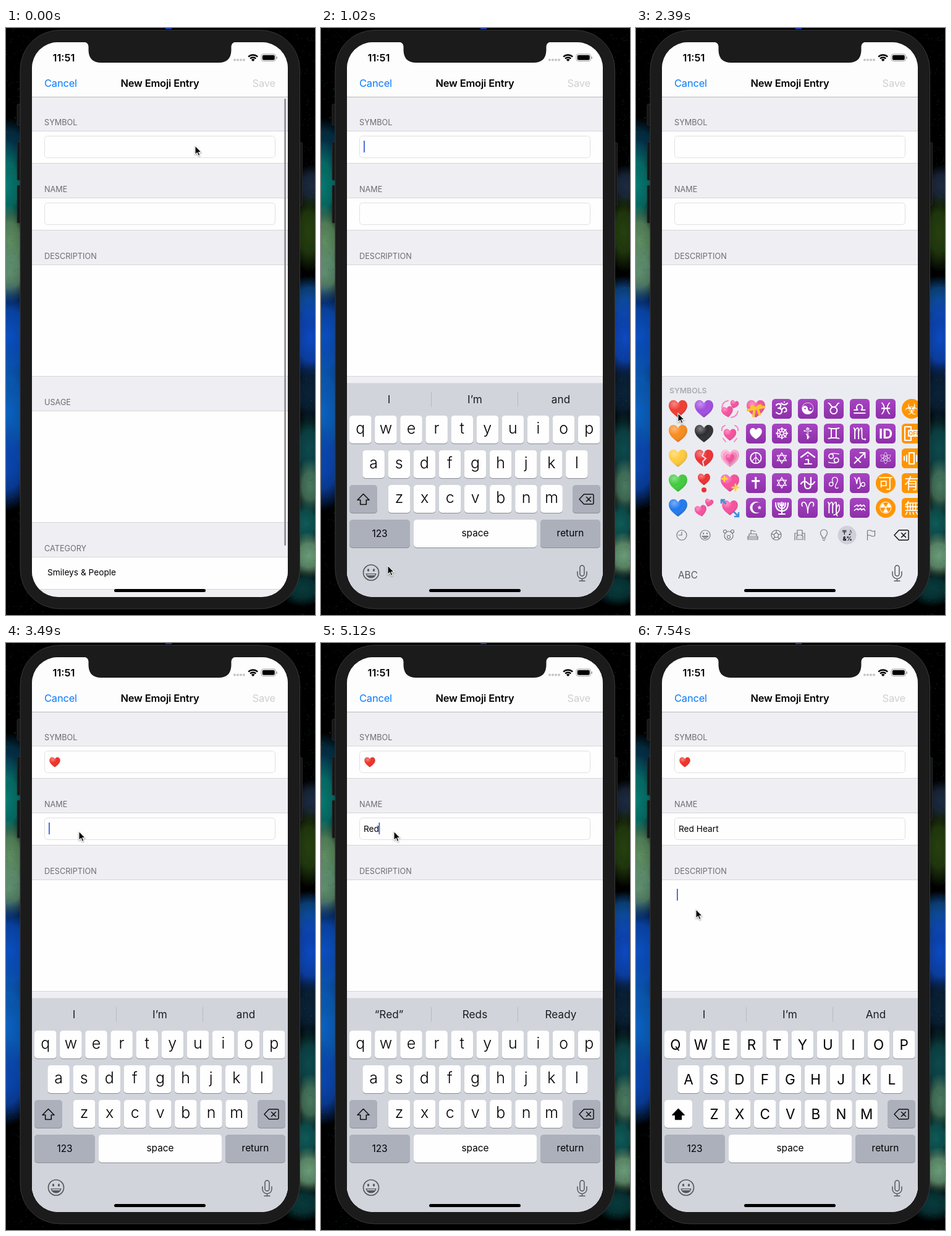
Animation of 500 by 948 pixels, one loop 7990 ms. Source, as an HTML page with a canvas:

```html
<!DOCTYPE html>
<html lang="en">
<head>
<meta charset="utf-8">
<title>New Emoji Entry</title>
<style>
html, body { margin: 0; width: 100%; height: 100%; overflow: hidden; background: #000; }
canvas, svg { position: absolute; left: 0; top: 0; width: 500px; height: 948px; }
text { font-family: Inter, Roboto, sans-serif; white-space: pre; }
.mid { text-anchor: middle; }
.nav { font-size: 16.5px; letter-spacing: -.2px; }
.head { font-size: 12.7px; fill: #6d6d72; }
.body { font-size: 13.7px; }
.hint { font-size: 17.2px; fill: #1c1c1e; }
.fn { font-size: 15.4px; }
.low { font-size: 25px; font-weight: 300; }
.cap { font-size: 22.5px; }
.sym { font: 26px "DejaVu Sans", sans-serif; }
.cjk { font: 500 24px "Noto Sans CJK JP", "Noto Sans CJK SC", sans-serif; }
.line { fill: none; stroke-linecap: round; stroke-linejoin: round; }
</style>
</head>
<body>
<canvas id="sky" width="500" height="948"></canvas>
<svg id="stage" viewBox="0 0 500 948"></svg>
<script>
const LOOP = 7990;

// ---------- backdrop ----------
function paintSky() {
  const g = document.getElementById('sky').getContext('2d');
  let seed = 7;
  const rnd = () => (seed = seed * 16807 % 2147483647) / 2147483647;
  g.fillStyle = '#000';
  g.fillRect(0, 0, 500, 948);
  const clouds = [
    [5, 190, 40, 45, '#04324a'], [0, 255, 40, 75, '#067a72'], [6, 345, 34, 60, '#5f8f62'],
    [4, 395, 40, 50, '#5f8f70'], [4, 500, 60, 90, '#0a4fc0'], [0, 620, 60, 110, '#0b62c4'],
    [0, 710, 50, 70, '#0a46b0'], [494, 255, 30, 35, '#1c2a40'], [490, 330, 30, 65, '#26400f'],
    [490, 440, 40, 40, '#0c4a8e'], [492, 500, 40, 75, '#0d49c0'], [490, 590, 30, 50, '#0a2238'],
    [490, 680, 30, 60, '#0d4a4e'], [492, 740, 25, 45, '#4a7a60'], [485, 800, 30, 40, '#0e5a58'],
    [490, 852, 35, 38, '#6a9c78'], [480, 905, 40, 30, '#083a3c']
  ];
  for (const [x, y, rx, ry, color] of clouds) {
    g.save();
    g.translate(x, y);
    g.scale(rx, ry);
    const fade = g.createRadialGradient(0, 0, 0, 0, 0, 1);
    fade.addColorStop(0, color);
    fade.addColorStop(.5, color + 'd0');
    fade.addColorStop(1, color + '00');
    g.fillStyle = fade;
    g.fillRect(-1, -1, 2, 2);
    g.restore();
  }
  const dust = ['#0d5a55', '#2f4a16', '#0b3d70', '#3a6a50'];
  for (let i = 0; i < 1500; i++) {
    const x = rnd() < .5 ? rnd() * 60 : 500 - rnd() * 60;
    g.globalAlpha = .2 + rnd() * .5;
    g.fillStyle = dust[rnd() * 4 | 0];
    g.fillRect(x | 0, rnd() * 948 | 0, 1, 1);
  }
  g.globalAlpha = 1;
  g.fillStyle = '#1838b0';
  g.fillRect(258, 0, 10, 2);
}

// ---------- drawing helpers ----------
const rect = (x, y, w, h, fill, r = 0, more = '') =>
  `<rect x="${x}" y="${y}" width="${w}" height="${h}" rx="${r}" fill="${fill}" ${more}/>`;
const text = (x, y, s, cls, more = '') => `<text x="${x}" y="${y}" class="${cls}" ${more}>${s}</text>`;
const line = (d, color, w = 1.5, x = 0, y = 0, fill = 'none') =>
  `<path class="line" d="${d}" transform="translate(${x} ${y})" stroke="${color}" stroke-width="${w}" style="fill:${fill}"/>`;
const ring = (r, x = 0, y = 0) => `M${x - r} ${y}a${r} ${r} 0 1 0 ${2 * r} 0a${r} ${r} 0 1 0 ${-2 * r} 0`;
const group = (id, s) => `<g id="${id}">${s}</g>`;

const HEART = 'M0 14C-4 11-15 4-15-5C-15-11-11-14-7.5-14C-4-14-1.5-12 0-9C1.5-12 4-14 7.5-14C11-14 15-11 15-5C15 4 4 11 0 14Z';
const heart = (x, y, fill, k = 1, turn = 0) =>
  `<g transform="translate(${x} ${y}) rotate(${turn}) scale(${k})"><path d="${HEART}" fill="${fill}"/><path d="${HEART}" fill="url(#shine)"/></g>`;
const erase = (x, y) =>
  line('M-4-8H9.5a2 2 0 0 1 2 2V6a2 2 0 0 1-2 2H-4L-11.5 0ZM0-3.5L7 3.5M7-3.5L0 3.5', '#111', 1.5, x, y);
const mic = y => rect(419, y - 13, 7, 17, 'none', 3.5, 'stroke="#55585c" stroke-width="1.5"') +
  line('M-7.5-3V1a7.5 7.5 0 0 0 15 0V-3M0 8.5V12M-4.5 12H4.5', '#55585c', 1.5, 422.5, y);
const grin = (x, y, r, color, w) => line(ring(r), color, w, x, y) +
  `<g transform="translate(${x} ${y}) scale(${r / 12.5})" fill="${color}"><ellipse cx="-4.5" cy="-4" rx="1.6" ry="2.2"/>
  <ellipse cx="4.5" cy="-4" rx="1.6" ry="2.2"/><path d="M-8.5 1.5H8.5C8 6 4.500 9 0 9S-8 6-8.500 1.500Z"/></g>` +
  line('M-6 3.500H6', '#e4e6ea', 1.3 * r / 12.5, x, y);

// ---------- phone and form ----------
function phone() {
  const side = (x, y, h) => rect(x, y, 6, h, '#161616', 1.5, 'stroke="#303030" stroke-width=".8"');
  return side(18, 123, 34) + side(18, 184, 62) + side(18, 254, 61) + side(473.5, 185, 101) +
    rect(23, 3.5, 452.5, 934.5, '#1b1b1b', 64, 'stroke="#383838"');
}

function form() {
  let s = rect(42, 23, 414, 896, '#efeef3') + rect(42, 23, 414, 88, '#fdfdfd') + rect(42, 111, 414, 1, '#b9b9bc');
  const rows = [['SYMBOL', 166, 52], ['NAME', 274, 52], ['DESCRIPTION', 382, 180], ['USAGE', 618, 180], ['CATEGORY', 854, 52]];
  for (const [title, y, h] of rows) {
    s += text(62, y - 9, title, 'head') + rect(42, y, 414, h + 1, '#d6d6da') + rect(42, y + 1, 414, h - 1, '#fefefe');
  }
  for (const y of [174.5, 282.5]) s += rect(62.5, y, 373, 35, '#fefefe', 5, 'stroke="#e0e0e2"');
  return s + text(62, 95, 'Cancel', 'nav', 'fill="#0a7aff"') +
    text(249, 95, 'New Emoji Entry', 'nav mid', 'font-weight="600"') +
    text(436, 95, 'Save', 'nav', 'text-anchor="end" fill="#d0d0d2"') +
    text(67, 884, 'Smileys &amp; People', 'body') +
    group('entry', heart(79, 192.500, '#ee3026', .58)) +
    `<text id="name" class="body" x="69" y="305"></text>` +
    `<rect id="caret" width="1.8" height="19" fill="#3b62d6"/>` +
    `<rect id="thumb" x="450.300" y="114" width="2.700" rx="1.300" fill="#8f8f92"/>`;
}

function status() {
  let s = text(93.5, 53.500, '11:51', 'mid', 'font-size="16.300" font-weight="600"');
  for (let i = 0; i < 4; i++) s += `<circle cx="${370 + i * 5}" cy="51.500" r="2" fill="#c6c6c9"/>`;
  const arc = r => `M${-.7 * r} ${-.7 * r}A${r} ${r} 0 0 1 ${.7 * r} ${-.7 * r}`;
  s += `<path d="${arc(10.7)}${arc(6.6)}" transform="translate(399.700 54)" fill="none" stroke="#000" stroke-width="2.400"/>`;
  s += `<path d="M0 0L-2.800-2.800A4 4 0 0 1 2.800-2.800Z" transform="translate(399.700 54)"/>`;
  return s + rect(413, 42, 23.500, 11.500, 'none', 3.500, 'stroke="#a0a0a2"') + rect(414.800, 43.800, 20, 8, '#000', 2) +
    rect(437.500, 46, 1.500, 4, '#a0a0a2', .7);
}

// ---------- letter keyboard ----------
function letters() {
  const key = (x, y, w, fill = '#fefefe', more = '') =>
    rect(x, y + 1, w, 45, '#8a8d94', 5) + rect(x, y, w, 45, fill, 5, more);
  const gray = '#abb0bb', arrow = 'M0-9L9.500.800H4.800V8H-4.800V.800H-9.500Z';
  let s = rect(42, 573.5, 414, 380, '#d1d4db'), low = '', cap = '';
  [['qwertyuiop', 46, 626], ['asdfghjkl', 67.300, 682], ['zxcvbnm', 108.700, 738]].forEach(([row, x0, y]) =>
    [...row].forEach((c, i) => {
      const x = x0 + i * 41.1;
      s += key(x, y, 35.6);
      low += text(x + 17.8, y + 29, c, 'low mid');
      cap += text(x + 17.8, y + 31, c.toUpperCase(), 'cap mid');
    }));
  low += line(arrow, '#111', 1.6, 68.5, 761.500);
  cap += line(arrow, '#000', 1.6, 68.5, 761.500, '#000');
  s += key(46, 738, 45, gray, 'id="shift"') + key(407, 738, 45, gray) + erase(429.5, 761) +
    key(46, 794, 98, gray) + key(150, 794, 199) + key(355, 794, 97, gray) +
    text(95, 822, '123', 'fn mid') + text(249.5, 821, 'space', 'fn mid') + text(403.5, 821, 'return', 'fn mid');
  for (const x of [178, 318]) s += rect(x, 588, 1, 24, '#b8bbc3');
  [110, 249, 388].forEach((x, i) => s += `<text id="hint${i}" class="hint mid" x="${x}" y="606"></text>`);
  return s + group('low', low) + group('cap', cap) + grin(81, 879.500, 12.5, '#55585c', 1.7) + mic(881);
}

// ---------- symbol keyboard ----------
const PINK = '#f74f9e', ROSE = '#fb86bd';

function tile(x, y, mark, orange, round) {
  let s = rect(x - 16, y - 16, 32, 32, orange ? '#ff9500' : 'url(#violet)', round ? 16 : 5.5);
  if (mark === 'heart') return s + `<path d="${HEART}" transform="translate(${x} ${y}) scale(.650)" fill="#fff"/>`;
  if (mark === 'ID') return s + text(x, y + 8, mark, 'mid', 'font-size="22" font-weight="700" fill="#fff"');
  if (mark === 'OFF') return s + line('M-11-11H-1V11H-11Z', '#fff', 2, x, y) + rect(x - 6, y - 6, 20, 11, '#fff', 1) +
    text(x + 4, y + 3, mark, 'mid', 'font-size="9" font-weight="700" fill="#ff9500"');
  if (mark[0] === 'M') return s + line(mark, '#fff', 2.2, x, y);
  const han = '可有無'.includes(mark);
  return s + text(x, y + 9, mark + (han ? '' : '\uFE0E'), (han ? 'cjk' : 'sym') + ' mid', 'fill="#fff"');
}

function hearts() {
  const rows = [615, 655, 695, 735, 775];
  let s = '';
  ['#f03a30', '#f98a1d', '#ffcb3c', '#3fcb3c', '#1f78ee'].forEach((c, i) => s += heart(68, rows[i], c));
  s += heart(110, 615, '#a04be0') + heart(110, 655, '#2c2c30');
  s += heart(110, 695, '#ee2f32') + line('M0-10L-3-4L3 0L-2 5L0 14', '#ebecf1', 2, 110, 695);
  s += heart(110, 729, '#ee2f32', .66) + `<circle cx="110" cy="746" r="4" fill="#ee2f32"/>`;
  s += heart(105, 780, PINK, .64, -12) + heart(118, 767, PINK, .45, 15);
  s += heart(148, 620, PINK, .62, -10) + heart(159, 608, PINK, .46, 15) +
    line('M-13-2Q-12-12-3-13M13 4Q11 13 2 14', ROSE, 2, 152, 615);
  s += heart(152, 657, PINK, .68) + line('M-13-5Q-14-11-8-13M13-5Q14-11 8-13M-11 8L-7 13M11 8L7 13', ROSE, 2, 152, 655);
  s += heart(152, 695, '#fcaed2') + heart(152, 695, ROSE, .75) + heart(152, 695, PINK, .48);
  s += heart(152, 735, PINK) + line('M-9-11V-3M-13-7H-5M9 2V12M4 7H14', '#ffd33d', 3, 152, 735);
  s += heart(152, 775, PINK, .85) + line('M-14-13L-7-7M6 6L14 14M14 8V14H8M-14-8V-13H-9', '#3b8ede', 2.6, 152, 775);
  return s + heart(194, 615, PINK) + line('M-13 2L13-3M-2-1L-4 12M2-2L6 9', '#f8c72c', 4, 194, 615) +
    line('M0-1Q-8-9-8-2ZM0-1Q8-10 9-4Z', '#f8c72c', 2.5, 194, 615, '#f8c72c');
}

function symbols() {
  const om = 'M-9-6C-6-10 0-8-2-3Q-3-1-6-1Q1-1 0 5Q-3 11-9 6M0 1Q4-4 7 0Q9 5 4 5M-1-9Q4-4 9-9M4-11v.1';
  const lamp = 'M0-9V10M-5 10H5M-10-8Q-10 5 0 5Q10 5 10-8M-6-8Q-6 1 0 1Q6 1 6-8M-3-8Q-3-3 0-3Q3-3 3-8';
  const snake = 'M-5-9V2Q-5 9 0 9Q5 9 5 2V-9M-11 1Q-6-6 0 0T11-2';
  const shrine = 'M-11-2L0-10L11-2M0-4v.1M-3 2H1V9M-5 9H6';
  const buzz = 'M-4-9H4V9H-4ZM-8-5V5M8-5V5M-12-3V3M12-3V3';
  const grid = [
    ['', 'heart', '☮', '✝', '☪'], [om, '☸', '✡', '✡', lamp], ['☯', '☦', shrine, snake, '♈'],
    ['♉', '♊', '♋', '♌', '♍'], ['♎', '♏', '♐', '♑', '♒'], ['♓', 'ID', '⚛', '可', '☢'], ['☣', 'OFF', buzz, '有', '無']
  ];
  let s = rect(42, 563, 414, 356, '#ebecf1') + hearts() +
    text(54, 590, 'SYMBOLS', '', 'font-size="12.300" font-weight="600" fill="#a9abb1"');
  grid.forEach((col, i) => col.forEach((mark, j) => {
    if (mark) s += tile(194 + i * 42, 615 + j * 40, mark, i === 6 || '可☢'.includes(mark), '可☢☣'.includes(mark));
  }));
  const bar = [
    [74, ring(8) + 'M0-5V0H-5'],
    [150, ring(7, 0, 1) + ring(2.5, -6, -6) + ring(2.5, 6, -6) + ring(2.5, 0, 3) + 'M-3-1v.1M3-1v.1'],
    [189, 'M-8 2H8V7H-8ZM-6 2V-2H6V2M-3-2V-8L4-6M-8 4.500H8'],
    [227, ring(8) + 'M0-4L4-1L2.500 3.500H-2.500L-4-1ZM0-4V-8M4-1L8-2M2.500 3.500L5 6M-2.500 3.500L-5 6M-4-1L-8-2'],
    [265, 'M-8 8V-3H-4V-8H4V-3H8V8M-4-3V0M4-3V0M-5 7V2L-3 0H3L5 2V7ZM-2 3.500v.1M2 3.500v.1'],
    [304, 'M-2.500 4C-2.500 1-5.500 0-5.500-3.500a5.500 5.500 0 0 1 11 0C5.500 0 2.500 1 2.500 4ZM-2.500 6H2.500M-1.500 8.500H1.500'],
    [380, 'M-5.500 8V-7Q-2-9 1-7T6.500-7V1Q3 3 0 1T-5.500 1']
  ];
  s += `<circle cx="341.500" cy="819" r="15" fill="#d0d0da"/>`;
  for (const [x, d] of bar) s += line(d, '#74767d', 1.2, x, 819);
  return s + grin(112, 819, 8, '#74767d', 1.2) +
    text(342, 818, '〒♪', 'mid', 'style="font:700 9.500px \'Noto Sans CJK JP\',\'DejaVu Sans\',sans-serif"') +
    text(342, 827.500, '&amp;%', 'mid', 'font-size="9" font-weight="700"') +
    erase(429.5, 819) + text(68, 889, 'ABC', 'fn', 'fill="#55585c"') + mic(881);
}

// ---------- assemble ----------
paintSky();
const stage = document.getElementById('stage');
stage.innerHTML = `<defs>
  <clipPath id="screen"><rect x="42" y="23" width="414" height="896" rx="42"/></clipPath>
  <radialGradient id="shine" cx=".3" cy=".22" r=".85"><stop offset="0" stop-color="#fff" stop-opacity=".4"/>
    <stop offset=".45" stop-color="#fff" stop-opacity="0"/><stop offset="1" stop-opacity=".22"/></radialGradient>
  <linearGradient id="violet" x2="0" y2="1"><stop offset="0" stop-color="#a745c2"/><stop offset="1" stop-color="#8c2fa8"/></linearGradient>
</defs>` + phone() +
  `<g clip-path="url(#screen)">${form()}${group('letters', letters())}${group('symbols', symbols())}${status()}` +
  rect(175, 906, 148, 5, '#000', 2.5) + '</g>' +
  '<path fill="#1b1b1b" d="M126 22.500Q133 23 133.500 30V36Q134 56 154 56H344Q364 56 364.500 36V30Q365 23 372 22.500Z"/>' +
  group('mouse', '<path d="M0 0V14.500L3.400 11.400L5.600 16.600L8 15.600L5.800 10.500H10.300Z" stroke="#fff" stroke-width="1.100" style="filter:drop-shadow(0 1px 1px #0006)"/>');

const el = {};
stage.querySelectorAll('[id]').forEach(e => el[e.id] = e);

// ---------- timeline ----------
const path = [
  [0, 306, 190], [150, 306, 190], [240, 305, 190], [360, 305, 190], [640, 190, 560], [930, 108, 868], [1020, 108, 868],
  [1260, 90, 871], [1840, 90, 871], [2100, 82, 740], [2360, 68, 622], [2720, 68, 622], [3000, 122, 450],
  [3300, 118, 304], [6880, 118, 304], [7180, 97, 430]
];
const typed = [[0, ''], [4550, 'R'], [4760, 'Re'], [4980, 'Red'], [5320, 'Red '], [5450, 'Red H'], [5600, 'Red He'],
  [5770, 'Red Hea'], [5930, 'Red Hear'], [6150, 'Red Heart']];
const hints = [[0, 'I|I’m|and'], [4640, '“R”|Re|Really'], [4850, '“Re”|Red|Real'], [5080, '“Red”|Reds|Ready'],
  [5390, 'and|hair|one'], [5530, '“H”|He|Have'], [5700, '“He”|Head|Heart'], [6300, '“Heart”|Hearts|Heartbeat'], [7470, 'I|I’m|And']];
const blinks = [[740, 840], [1600, 1700], [2390, 2570], [3080, 3180], [4290, 4550], [7180, 7390]];

const clamp = v => Math.max(0, Math.min(1, v));
const latest = (steps, t) => steps.filter(s => s[0] <= t).pop()[1];
const show = (e, on) => e.style.display = on ? '' : 'none';

function pointer(t) {
  const i = path.findIndex(p => p[0] > t);
  if (i < 0) return path[path.length - 1].slice(1);
  const [t0, x0, y0] = path[i - 1], [t1, x1, y1] = path[i];
  const p = (t - t0) / (t1 - t0), k = p * p * (3 - 2 * p);
  return [x0 + (x1 - x0) * k, y0 + (y1 - y0) * k];
}

function caretAlpha(t) {
  let a = t < 150 ? 0 : 1;
  for (const [off, on] of blinks) {
    if (t > off - 180 && t < on + 90) a = t < on ? clamp((off - t) / 180) : clamp((t - on + 30) / 90);
  }
  return a;
}

function caretSpot(t) {
  if (t < 2620) return [69, 182];
  if (t < 3400) return [89, 182];
  if (t < 7390) return [69 + (el.name.textContent ? el.name.getComputedTextLength() - .5 : 0), 290];
  return [66, 397];
}

function draw(t) {
  const picking = t >= 1400 && t < 3420, caps = t >= 7470;
  show(el.letters, t >= 150 && !picking);
  show(el.symbols, picking);
  show(el.low, !caps);
  show(el.cap, caps);
  show(el.entry, t >= 2620);
  el.shift.setAttribute('fill', caps ? '#fefefe' : '#abb0bb');
  const drop = t < 600 ? 10.5 * Math.exp((240 - t) / 52) : 0;
  el.letters.setAttribute('transform', `translate(0 ${drop.toFixed(2)})`);
  el.thumb.setAttribute('height', t < 150 ? 722 : 322);
  el.thumb.setAttribute('opacity', clamp((700 - t) / 250));
  el.name.textContent = latest(typed, t);
  latest(hints, t).split('|').forEach((s, i) => el['hint' + i].textContent = s);
  const [cx, cy] = caretSpot(t);
  el.caret.setAttribute('x', cx);
  el.caret.setAttribute('y', cy);
  el.caret.setAttribute('opacity', caretAlpha(t));
  el.mouse.setAttribute('transform', `translate(${pointer(t)})`);
}

const start = performance.now();
function tick() {
  draw((performance.now() - start) % LOOP);
  requestAnimationFrame(tick);
}
tick();
</script>
</body>
</html>
```
